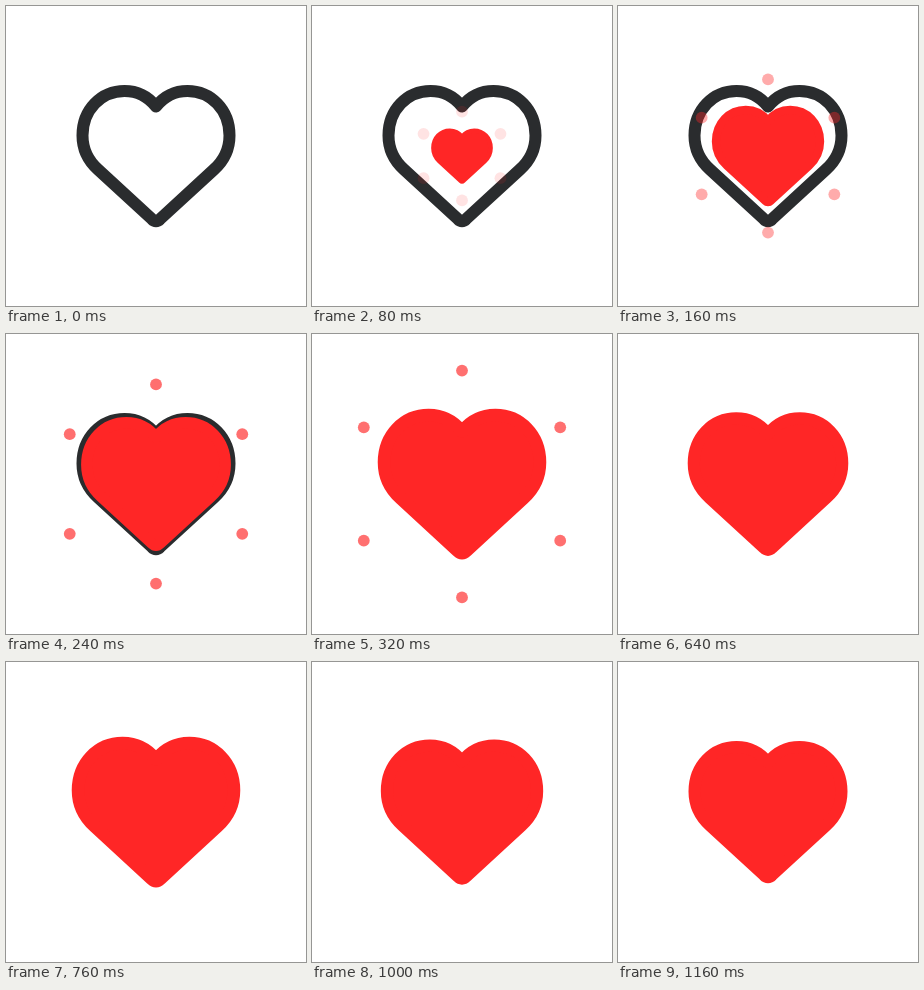
Recreate the animation shown at these times as an HTML page with a canvas. Size 300 by 300 pixels, loop 1880 ms.

```html
<!DOCTYPE html>
<html lang="en">
<head>
<meta charset="utf-8">
<title>Like button</title>
<style>
  html, body { margin: 0; width: 100%; height: 100%; overflow: hidden; background: #fff; }
  canvas { display: block; width: 300px; height: 300px; }
</style>
</head>
<body>
<canvas id="stage"></canvas>
<script>
const SIZE = 300, LOOP = 1880, STEP = 40;
const RED = '#ff2626', DARK = '#2a2c2e';
const canvas = document.getElementById('stage');
const ctx = canvas.getContext('2d');
const dpr = window.devicePixelRatio || 1;
canvas.width = canvas.height = SIZE * dpr;

// Centre line of the 12 px outline, around the middle of the stage
const heart = new Path2D(
  'M0-49.5C-8-59.5-19-65-31.5-65C-55-65-73.5-46-73.5-20.5' +
  'C-73.5-7-68 4.5-58 13.5L-4 63.2Q0 67.2 4 63.2L58 13.5' +
  'C68 4.5 73.5-7 73.5-20.5C73.5-46 55-65 31.5-65C19-65 8-59.5 0-49.5Z');

const linear = u => u;
const smooth = u => u * u * (3 - 2 * u);
const easeOut = power => u => 1 - (1 - u) ** power;

// Keys are [time, value, easing towards this key]
const scaleKeys = [[0, 0], [320, 1.06, easeOut(1.585)], [500, 0.947, smooth],
                   [760, 1.06, smooth], [1160, 1, smooth]];
const radiusKeys = [[0, 3], [400, 118, easeOut(2)]];
const alphaKeys = [[40, 0], [160, 0.39, linear], [280, 0.8, linear],
                   [320, 0.66, linear], [400, 0, linear]];

function valueAt(keys, t) {
  if (t <= keys[0][0]) return keys[0][1];
  for (let i = 1; i < keys.length; i++) {
    const [t0, a] = keys[i - 1], [t1, b, ease] = keys[i];
    if (t < t1) return a + (b - a) * ease((t - t0) / (t1 - t0));
  }
  return keys[keys.length - 1][1];
}

function drawHeart(scale, color, filled) {
  ctx.save();
  ctx.scale(scale, scale);
  ctx.lineWidth = 12;
  ctx.lineJoin = 'round';
  ctx.strokeStyle = ctx.fillStyle = color;
  if (filled) ctx.fill(heart);
  ctx.stroke(heart);
  ctx.restore();
}

function drawDots(radius, alpha) {
  ctx.globalAlpha = alpha;
  ctx.fillStyle = RED;
  for (let i = 0; i < 6; i++) {
    const angle = Math.PI * (i / 3 + 0.5);
    ctx.beginPath();
    ctx.arc(radius * Math.cos(angle), radius * Math.sin(angle), 5.9, 0, 2 * Math.PI);
    ctx.fill();
  }
  ctx.globalAlpha = 1;
}

function draw(t) {
  ctx.setTransform(dpr, 0, 0, dpr, 0, 0);
  ctx.fillStyle = '#fff';
  ctx.fillRect(0, 0, SIZE, SIZE);
  ctx.translate(SIZE / 2, SIZE / 2);

  const scale = valueAt(scaleKeys, t);
  const alpha = valueAt(alphaKeys, t);
  if (t < 320 && scale < 1) drawHeart(1, DARK, false);
  if (alpha > 0) drawDots(valueAt(radiusKeys, t), alpha);
  if (scale > 0) drawHeart(scale, RED, true);
}

const start = performance.now();
function tick() {
  const t = (performance.now() - start) % LOOP;
  draw(Math.floor(t / STEP) * STEP);
  requestAnimationFrame(tick);
}
tick();
</script>
</body>
</html>
```
